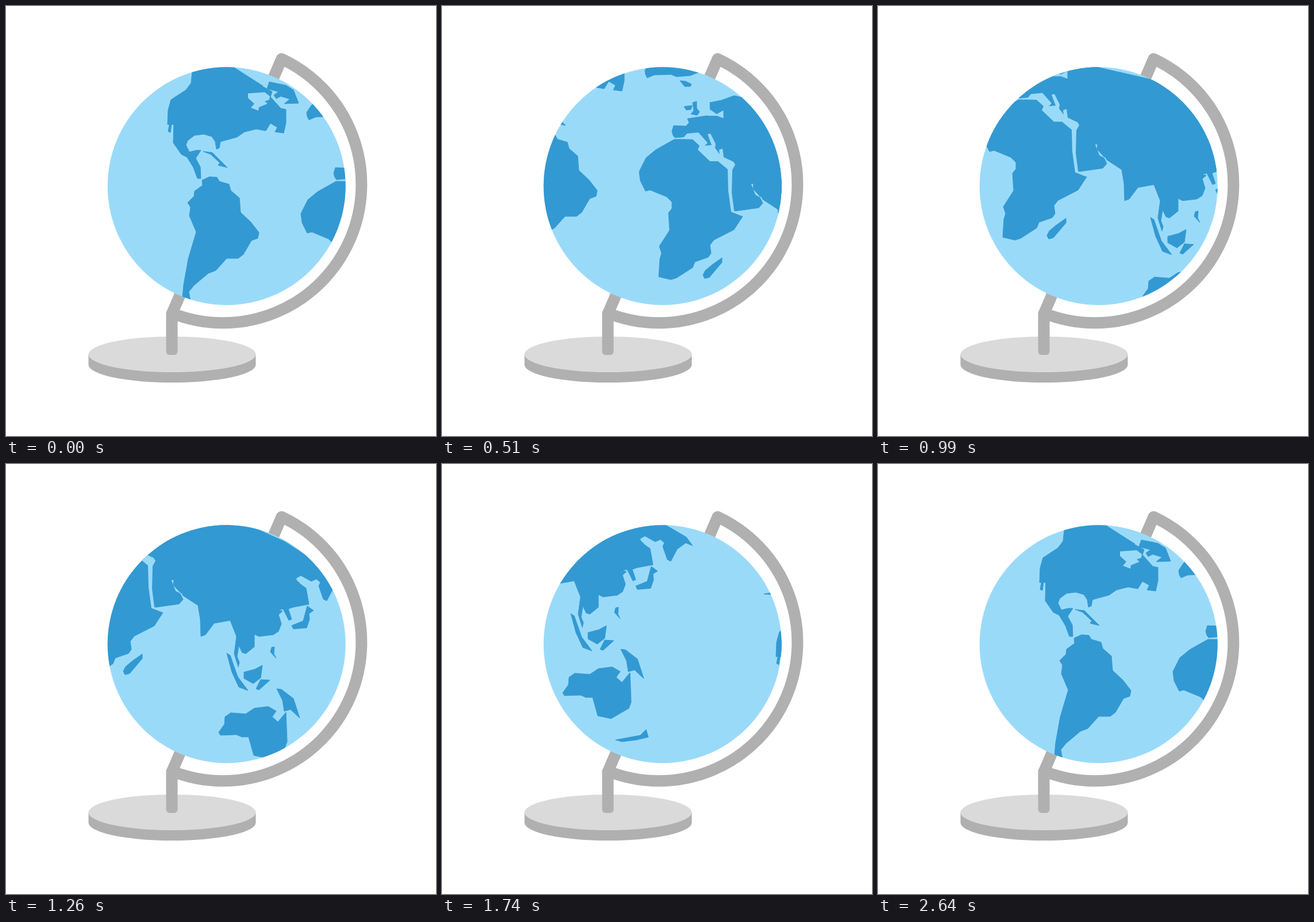
Animation, 748 px wide and 748 px high, one loop 2.67 s. Source, as an HTML page:

```html
<!DOCTYPE html>
<html lang="en">
<meta charset="utf-8">
<title>Spinning desk globe</title>
<style>
  html, body { margin: 0; height: 100%; overflow: hidden; background: #fff; }
  svg { display: block; width: 748px; height: 748px; }
  .metal { fill: #b0b0b0; }
  .arm { fill: none; stroke: #b0b0b0; stroke-width: 20; stroke-linejoin: round; }
  .land { fill: #3399d2; stroke: #3399d2; stroke-linejoin: round; }
  .sea { fill: #9adaf9; stroke: none; }
</style>
<svg viewBox="0 0 748 748">
  <clipPath id="disc"><circle cx="383.7" cy="313.3" r="207"/></clipPath>
  <path class="metal" d="M143.5 606V624A145.5 31 0 0 0 434.5 624V606Z"/>
  <ellipse cx="289" cy="606" rx="145.5" ry="31" fill="#dadada"/>
  <rect class="metal" x="278.5" y="528" width="20" height="79" rx="6"/>
  <path class="arm" d="M383.7 313.3L479.5 92A241 241 0 0 1 289 534.5Z"/>
  <circle class="sea" cx="383.7" cy="313.3" r="207"/>
  <g clip-path="url(#disc)">
    <g id="map">
      <g id="world" class="land">
        <!-- Americas: each group's data-step is when it stands at these places -->
        <g data-step="75">
          <path d="M390 153L408 150 403 141 420 138 424 133 468 135 494 152 512 152 530 165 577 195 550 200 500 262 411 262 412 237 417 219 443 202 452 190 454 170 437 157Z"/>
        </g>
        <g data-step="0">
          <path d="M300 170L400 109 419 125 463 149 460 158 478 178 487 180 487 203 483 221 468 219 472 211 460 204 452 217 435 214 415 219 402 228 373 236 371 247 366 249 364 236 358 227 344 223 328 225 316 234 313 242 319 254 331 251 339 251 330 265 338 280 339 300 333 300 326 281 315 263 305 258 291 238 292 197 289 198 286 220 282 218 286 197 282 190 284 182Z"/>
          <path d="M458 132L487 138 500 146 509 169 484 170 494 162 478 157 470 161 466 155 474 149 454 144Z"/>
          <path d="M343 253L359 255 385 281 369 277 372 273 356 258Z"/>
          <path d="M341 303L354 297 367 298 371 305 388 310 391 321 406 334 408 359 426 376 440 394 438 404 427 408 413 432 404 439 384 439 365 460 352 465 327 486 318 497 322 518 306 518 309 485 317 440 331 393 319 365 321 350 316 342 327 331 328 322 342 312Z"/>
          <path class="sea" d="M421 152L450 150 459 157 458 163 450 166 455 170 440 176 439 182 426 177 432 170 421 160Z"/>
        </g>
        <!-- Greenland, Iceland, Britain, Ireland, Africa, Madagascar, Europe -->
        <g data-step="17">
          <path d="M354 119L353 112 361 100 390 70 465 108 432 121 408 123 398 119 369 120 357 125Z"/>
          <path d="M414 130L424 131 434 136 432 140 422 140Z"/>
          <path d="M436 168L443 166 443 178 448 184 444 190 433 188 438 182Z"/>
          <path d="M421 175L435 173 433 180 425 181Z"/>
          <path d="M404 232L436 232 500 270 506 358 523 366 508 389 473 407 466 416 468 430 463 437 440 445 436 455 408 473 398 476 377 471 379 440 382 430 378 418 396 390 394 360 400 352 400 341 391 332 362 320 354 322 345 304 343 288 355 264 372 250Z"/>
          <path d="M487 438L487 446 465 472 457 474 454 468 458 460 470 450Z"/>
          <path d="M402 225L400 218 403 208 424 209 430 203 427 196 467 190 466 168 486 164 508 156 522 159 543 176 640 200 640 330 588 345 578 342 553 331 541 318 542 309 537 309 545 329 553 333 558 343 551 351 508 357 500 285 475 260 430 228 405 229Z"/>
          <path class="sea" d="M406 230L421 228 426 222 446 220 462 238 457 243 469 242 462 223 467 222 476 240 475 247 483 258 482 250 488 248 490 263 507 271 510 276 505 285 504 325 508 356 523 366 503 358 498 322 497 284 480 270 466 270 445 250 448 243 436 232Z"/>
          <path class="sea" d="M466 180L478 188 494 179 498 173 512 173 511 179 503 181 497 198 478 191 462 191Z"/>
        </g>
        <!-- Asia: north, south, then the islands down to New Guinea -->
        <g data-step="42">
          <path d="M240 100L240 55 293 68 385 89 432 111 485 135 522 159 585 196 596 211 584 206 569 217 558 238 552 235 544 212 547 206 540 200 531 204 513 194 504 199 508 206 522 216 527 244 440 260 300 200Z"/>
          <path d="M523 236L511 245 491 252 497 270 492 272 481 250 471 246 474 254 481 256 474 262 479 278 474 291 465 297 440 300 432 296 432 318 417 330 411 328 405 316 402 335 406 345 404 353 397 330 401 300 390 272 362 277 347 297 339 300 338 270 334 246 308 229 290 190 400 150 510 206Z"/>
          <path d="M524 247L535 255 527 260 528 270 523 285 500 287 497 281 517 273Z"/>
          <path d="M384 329L390 333 403 370 421 394 405 388 393 362Z"/>
          <path d="M414 362L433 357 446 350 443 372 430 382 414 373Z"/>
          <path d="M435 391L443 375 459 376 440 393Z"/>
          <path d="M462 319L467 318 466 330 470 338 460 327Z"/>
          <path d="M471 391L479 392 500 408 511 442 495 427 484 430 481 411Z"/>
        </g>
        <!-- Australia and New Zealand -->
        <g data-step="58">
          <path d="M210 398L220 384 221 371 231 364 257 366 272 356 296 353 310 361 303 371 313 380 327 363 329 414 325 425 294 443 271 438 262 406 250 406 241 402 213 403Z"/>
          <path d="M302 480L345 472 355 462 359 475 338 480 313 483Z"/>
        </g>
      </g>
    </g>
  </g>
</svg>
<script>
// The flat map slides behind a round window, one step every 30 ms.
const STEPS = 88, STEP_MS = 30, LOOP_MS = 2670, DX = 10, DY = 4.3;
const map = document.getElementById("map");
const world = document.getElementById("world");
const shift = (node, steps) =>
  node.setAttribute("transform", `translate(${steps * DX} ${steps * DY})`);

for (const group of world.children) shift(group, +group.dataset.step);
for (const turn of [-STEPS, STEPS]) {
  const copy = world.cloneNode(true);
  copy.removeAttribute("id");
  shift(copy, turn);
  map.append(copy);
}

function frame() {
  shift(map, -Math.floor(performance.now() % LOOP_MS / STEP_MS));
  requestAnimationFrame(frame);
}
frame();
</script>
</html>
```
